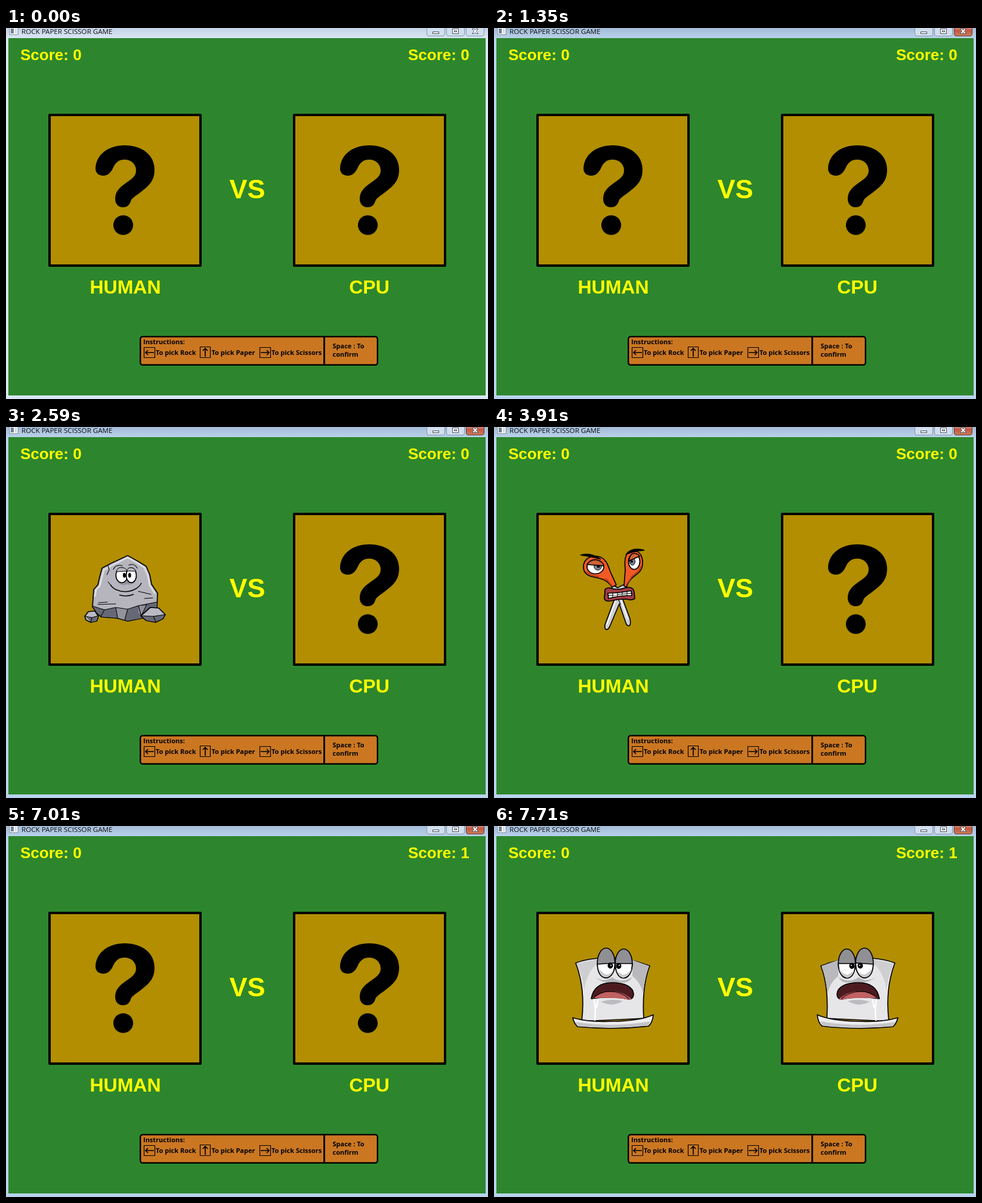
Animation, 808 px wide and 623 px high, one loop 8000 ms. Source, as an HTML page:

```html
<!DOCTYPE html>
<html lang="en">
<head>
<meta charset="utf-8">
<title>Rock Paper Scissor Game</title>
<style>
html, body { margin: 0; width: 100%; height: 100%; overflow: hidden; }
svg { display: block; width: 808px; height: 623px; }
.big { font: bold 26px "Liberation Sans", sans-serif; fill: #ff0; }
.help { font: bold 11px "Open Sans", sans-serif; }
.ink { stroke: #000; stroke-width: 1.7; stroke-linejoin: round; stroke-linecap: round; }
.thin { fill: none; stroke: #000; stroke-width: 1.1; stroke-linecap: round; }
</style>
</head>
<body>
<svg viewBox="0 0 808 623">
<defs>
  <linearGradient id="bar" x2="0" y2="1"><stop stop-color="#c3d3e6"/><stop offset="1" stop-color="#d9e6f4"/></linearGradient>
  <linearGradient id="barOn" x2="0" y2="1"><stop stop-color="#a3bcd8"/><stop offset="1" stop-color="#b9d1ea"/></linearGradient>
  <linearGradient id="red" x2="0" y2="1"><stop stop-color="#d9a095"/><stop offset=".4" stop-color="#c4573f"/><stop offset="1" stop-color="#c9805c"/></linearGradient>

  <g id="unknown">
    <path d="M150 236C151 212 172 197 199 197C228 197 249 213 249 238C249 258 238 266 224 277C213 285 211 286 209 291C207 298 202 301 196 301C188 301 183 295 183 287C183 275 190 268 200 261C213 252 218 248 218 239C218 229 210 221 199 221C188 221 183 227 179 236C175 244 170 248 163 248C155 248 150 243 150 236Z"/>
    <circle cx="196.5" cy="331" r="16.6"/>
  </g>

  <g id="rock">
    <path class="ink" fill="#b6b5bd" d="M145 302L147 273L154 265L157 252L161 237L176 229L204 216L222 226L235 234L241 248L244 264L254 279L253 305L234 320L204 326L186 321L160 319L152 312Z"/>
    <path fill="none" stroke="#dcdce2" stroke-width="3" d="M149 285L151 273L157 267L164 240L178 232L204 219L220 228L232 236L238 250L241 266L250 280"/>
    <path fill="#666975" d="M146 301L165 307L184 303L204 306L222 300L253 294L252 305L234 320L204 325L186 320L160 318L152 312Z"/>
    <path fill="#92939d" d="M184 303L204 306L199 324L187 320ZM222 300L236 301L228 316L222 312Z"/>
    <path class="thin" d="M146 301L165 307L184 303L204 306L222 300L253 294M165 307L159 318M184 303L187 320M204 306L199 324M222 300L227 318M236 298L228 315"/>
    <path class="ink" fill="#babac2" d="M132 318L138 310L149 309L155 318L152 326L142 328L134 324ZM226 317L242 303L256 304L267 315L263 322L251 328L235 325Z"/>
    <path fill="#666975" d="M134 319L144 320L154 317L151 326L142 327ZM228 317L246 318L266 315L262 322L251 327L236 324Z"/>
    <path class="thin" d="M133 318L144 320L155 317M144 320L142 328M227 317L247 318L267 315M247 318L251 327M155 295L170 294M154 298L184 297M222 276L243 281M232 288L246 287M171 233L173 240L169 248M171 260L176 266"/>
    <path class="thin" d="M180 239Q184 230 195 233M206 232Q215 228 220 237"/>
    <path fill="#93949e" d="M183 252Q190 270 203 264Q216 268 220 251Z"/>
    <g class="ink" fill="#fff" stroke-width="1.3"><ellipse cx="194" cy="249" rx="9.7" ry="12.5"/><ellipse cx="210" cy="249" rx="8.5" ry="12.3"/></g>
    <path fill="#b6b5bd" stroke="#000" d="M185 243Q187 235 194 236Q201 236 203 242ZM202 242Q204 236 210 236Q216 237 218 242Z"/>
    <ellipse cx="198.5" cy="249" rx="2.6" ry="4"/><ellipse cx="207.3" cy="249" rx="2.4" ry="4"/>
    <path fill="none" stroke="#000" stroke-width="1.5" d="M175 265Q180 272 187 274Q202 280 217 272Q224 268 227 262M190 282Q202 286 214 281"/>
  </g>

  <g id="scissors">
    <path class="ink" fill="#d0d0d2" d="M198 264L207 270L221 263L222 275L215 287L228 322Q230 333 226 334Q222 333 221 329L210 297L194 335Q191 341 188 340Q185 338 186 332L203 286L197 274Z"/>
    <path fill="none" stroke="#fff" stroke-width="1.5" d="M205 289L189 332M213 291L224 323"/>
    <path class="thin" d="M207 285L212 298"/>
    <g class="ink" fill="#f05a26">
      <path d="M150 236C149 223 160 216 173 217C187 219 191 231 195 243L205 265L198 269C190 258 183 255 172 253C158 251 150 246 150 236Z"/>
      <path d="M218 267L220 240C218 222 220 207 234 208C246 208 250 220 249 231C248 243 239 247 232 253C227 258 224 262 222 269Z"/>
    </g>
    <path fill="none" stroke="#b93a18" stroke-width="2" d="M154 243Q165 251 176 251M187 254L198 267M247 233Q243 243 232 250L222 265"/>
    <g class="ink" fill="#fff"><ellipse cx="170" cy="235" rx="14" ry="11.5"/><ellipse cx="235" cy="226" rx="9.5" ry="13"/></g>
    <circle cx="174" cy="234" r="6.3" fill="#7c8490" stroke="#000"/><circle cx="175" cy="234" r="2.5"/>
    <ellipse cx="232" cy="226" rx="4.5" ry="6" fill="#7c8490" stroke="#000"/><circle cx="231" cy="226" r="2"/>
    <path class="ink" fill="#cf6237" d="M156 231Q161 222 172 223Q183 226 184 233ZM226 225Q227 213 235 212Q242 213 244 217Z"/>
    <path d="M145 215Q162 210 179 222Q161 217 145 215ZM221 214Q232 201 252 207Q235 208 221 214Z" stroke="#000" stroke-width="1.5"/>
    <path class="ink" fill="#a33c42" d="M186 279Q184 270 193 270Q207 275 220 270Q233 267 235 277L236 288Q231 292 222 289Q208 289 196 292Q184 294 185 285Z"/>
    <path class="ink" fill="#fff" d="M191 279Q209 279 230 275L231 283Q210 283 192 288Z"/>
    <path class="thin" d="M192 283Q211 281 231 279M199 279L199 286M207 278L207 284M215 277L215 283M223 276L223 283"/>
  </g>

  <g id="paper">
    <path class="ink" fill="#e6e6e8" d="M137 230C155 223 177 221 200 221C225 222 246 229 261 235C252 258 249 290 251 323L147 328C151 295 149 262 137 230Z"/>
    <path fill="#b9b9bd" d="M232 225L260 235Q253 254 250 281Q246 263 232 252Z"/>
    <path fill="#cfcfd2" d="M138 231Q148 249 151 275Q156 244 174 230L172 224Z"/>
    <path class="ink" fill="#ededef" d="M132 322Q160 330 200 328Q245 327 267 317Q266 330 259 336Q200 343 140 337Q134 331 132 322Z"/>
    <path fill="#c4c4c8" d="M136 329Q198 339 262 328L258 335Q200 341 141 336Z"/>
    <path fill="#b5b5b9" d="M168 253Q184 264 198 254Q212 265 232 254Q224 266 210 262Q184 267 168 253Z"/>
    <g class="ink" fill="#8f8f94"><ellipse cx="188" cy="230" rx="14.8" ry="25"/><ellipse cx="217.5" cy="231" rx="14.3" ry="24.5"/></g>
    <path class="ink" fill="#fff" d="M173.3 232L202.7 230Q202 253 188 255Q174 254 173.3 232ZM203.3 231L231.8 231Q231 253 217 255.5Q204 254 203.3 231Z"/>
    <path fill="#c9c9cd" d="M175 240Q179 254 188 254Q196 253 200 243Q193 251 186 249ZM205 243Q210 254 217 255Q228 252 231 239Q224 250 216 250Z"/>
    <ellipse cx="195" cy="234.5" rx="4.5" ry="5"/><ellipse cx="209" cy="235" rx="4.5" ry="5"/>
    <circle cx="196" cy="234" r="1" fill="#fff"/><circle cx="210" cy="234" r="1" fill="#fff"/>
    <path class="ink" fill="#4c1b20" d="M163 290C166 272 178 263 198 263C219 263 233 270 234 282Q234 291 226 291Q198 285 163 290Z"/>
    <path fill="#c16162" d="M165 289Q180 277 196 278Q215 277 229 289Q234 294 217 290Q196 288 165 289Z"/>
    <path class="thin" d="M167 288Q181 277 196 278Q215 279 226 290"/>
    <path fill="#bcbcc0" d="M179 295Q198 289 216 294Q208 299 197 300Q186 299 179 295Z"/>
    <path fill="none" stroke="#fff" stroke-width="2.5" stroke-linecap="round" d="M168 292L170 307L169 326M174 292L172 304"/>
  </g>
</defs>

<rect id="border" width="808" height="623"/>
<rect id="titlebar" width="808" height="17"/>
<rect x="6" y="-2" width="14" height="13" fill="#fff" stroke="#7a8794"/>
<rect x="8" y="1" width="5" height="8" fill="#6f8094"/><rect x="15" y="1" width="3" height="8" fill="#d5dce4"/>
<text x="26" y="10" font-family="Open Sans, sans-serif" font-size="11.6" fill="#111">ROCK PAPER SCISSOR GAME</text>
<g fill="#d0deed" stroke="#8797aa">
  <path d="M705.5-2V10Q705.5 13.5 709 13.5H732Q735.5 13.5 735.5 10V-2Z"/>
  <path d="M738.5-2V10Q738.5 13.5 742 13.5H765Q768.5 13.5 768.5 10V-2Z"/>
  <path id="close" d="M771.5-2V10Q771.5 13.5 775 13.5H798Q801.5 13.5 801.5 10V-2Z"/>
</g>
<g fill="#fff" stroke="#4b5461">
  <rect x="715.5" y="6.5" width="10" height="3"/>
  <rect x="748.5" y="1.5" width="10" height="8"/><rect x="751.5" y="4.5" width="4" height="2"/>
  <path d="M781.5 1.5H785L786.5 3.5L788 1.5H791.5L788.5 5.5L791.5 9.5H788L786.5 7.5L785 9.5H781.5L784.5 5.5Z"/>
</g>

<rect x="4" y="17" width="800" height="600" fill="#2d862d"/>
<g class="big">
  <text x="24" y="54">Score: 0</text>
  <text x="674" y="54">Score: <tspan id="score">0</tspan></text>
  <text x="374.5" y="286" style="font-size:45px">VS</text>
  <g text-anchor="middle" style="font-size:32px"><text x="200" y="446">HUMAN</text><text x="609" y="446">CPU</text></g>
</g>
<rect id="winner" x="665" y="28" width="119" height="44" fill="none" stroke="#000" stroke-width="2"/>
<g fill="#b28e00" stroke="#000" stroke-width="4" stroke-linejoin="round">
  <rect x="73" y="146" width="253" height="253"/><rect x="483" y="146" width="253" height="253"/>
</g>
<use id="human"/><use id="cpu"/>

<rect x="225.2" y="518.2" width="397.6" height="47.6" rx="4" fill="#cb7722" stroke="#000" stroke-width="2.4"/>
<path d="M533.5 518V566" stroke="#000" stroke-width="3"/>
<g fill="none" stroke="#000" stroke-width="1.2">
  <path d="M231.5 536.5h18v17h-18zM325.5 535.5h17v18h-17zM425.5 536.5h18v17h-18z"/>
  <path stroke-width="1.7" d="M248 545H234M238 541L234 545L238 549M334 552V538M330 542L334 538L338 542M427 545H441M437 541L441 545L437 549"/>
</g>
<g class="help">
  <text x="230" y="531">Instructions:</text>
  <text x="251" y="549">To pick Rock</text>
  <text x="344.5" y="549">To pick Paper</text>
  <text x="445" y="549">To pick Scissors</text>
  <text x="547.5" y="538">Space : To</text>
  <text x="547.5" y="552">confirm</text>
</g>
<path id="cursor" d="M.5 .5V16.5L4 13L6.5 18.5L9 17.5L6.5 12H11.5Z" fill="#fff" stroke="#000"/>
</svg>

<script>
const LOOP = 8000;
const el = id => document.getElementById(id);
const set = (id, attrs) => { for (const k in attrs) el(id).setAttribute(k, attrs[k]); };
const show = (id, on) => set(id, { visibility: on ? 'visible' : 'hidden' });

// Each entry: start time, card shown from then on
const human = [[0, 'unknown'], [2280, 'paper'], [2590, 'rock'], [3910, 'scissors'], [7010, 'unknown'], [7320, 'paper']];
const cpu = [[0, 'unknown'], [5380, 'rock'], [7010, 'unknown'], [7710, 'paper']];
const current = (track, t) => track.filter(([start]) => start <= t).pop()[1];

function moveCursor(t) {
  show('cursor', t >= 70 && t < 1350);
  const p = Math.min(10, Math.max(0, Math.floor((t - 70) / 80))) / 10;
  const e = p * p * (3 - 2 * p);
  const [x, y] = t < 1270 ? [728 - 61 * e, 578 - 575 * e] : [684, 7];
  set('cursor', { transform: `translate(${Math.round(x)} ${Math.round(y)})` });
}

function draw(t) {
  const active = t >= 1110, focusing = t >= 1030;
  set('border', { fill: active ? '#b9d3ed' : focusing ? '#c9dcf0' : '#d9e6f4' });
  set('titlebar', { fill: focusing ? 'url(#barOn)' : 'url(#bar)' });
  set('close', { fill: focusing ? 'url(#red)' : '#d0deed', stroke: focusing ? '#6b3a34' : '#8797aa' });

  const card = current(cpu, t);
  set('human', { href: '#' + current(human, t) });
  set('cpu', {
    href: '#' + card,
    transform: card === 'unknown' ? 'translate(410 0)' : 'translate(809 0) scale(-1 1)'
  });
  el('score').textContent = t < 5380 ? 0 : 1;
  show('winner', t >= 5380 && t < 7010);
  moveCursor(t);
}

const begin = performance.now();
function tick() {
  draw((performance.now() - begin) % LOOP);
  requestAnimationFrame(tick);
}
tick();
</script>
</body>
</html>
```
